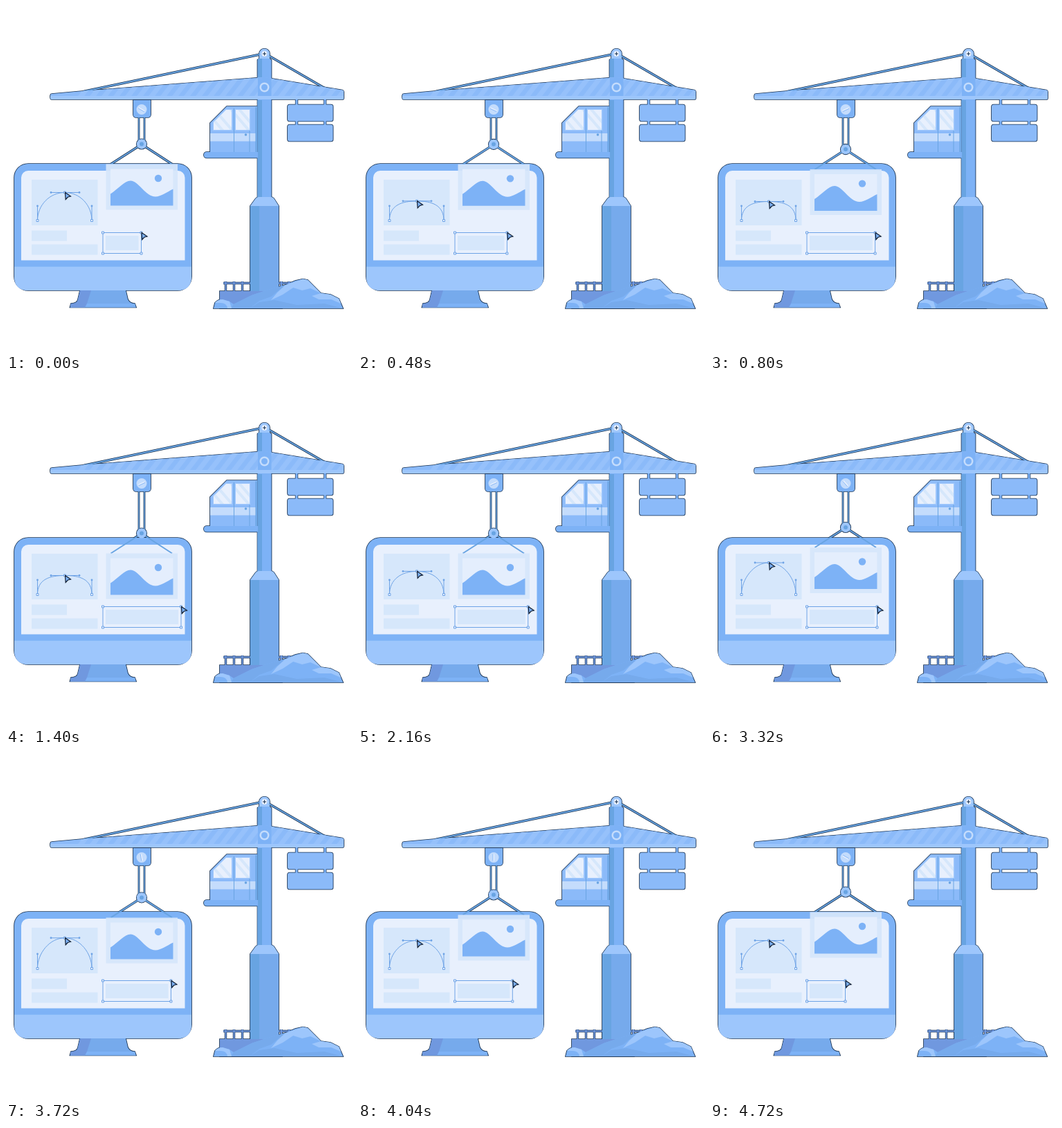
An HTML page with a canvas that plays this animation: 500 by 500 pixels, repeating every 5080 ms.

```html
<!DOCTYPE html>
<html lang="en">
<head>
<meta charset="utf-8">
<title>Crane building a page</title>
<style>
  html, body { margin: 0; width: 100%; height: 100%; overflow: hidden; background: #fff; }
  canvas { display: block; width: 100vw; height: 100vh; }
</style>
</head>
<body>
<canvas id="stage" width="500" height="500"></canvas>
<script>
const ctx = document.getElementById('stage').getContext('2d');
const LOOP = 5080, STEP = 40;
const C = {
  edge: '#17304f', mid: '#7db2f6', light: '#9dc6fc', soft: '#8bbaf9', dark: '#68a4e2',
  deep: '#7098df', shade: '#76aaec', panel: '#d6e7fb', screen: '#e8f0fd', line: '#6ea3e6', pale: '#c4dcfc'
};

// Each track is a list of [time, value]; values ease between neighbours.
const tracks = {
  hook: [[0, 199.5], [400, 199.5], [1400, 221.5], [2280, 221.5], [4720, 199.5]],
  right: [[0, 195.5], [1200, 253], [1880, 253], [2600, 231], [2680, 231], [3280, 241.5], [3520, 241.5], [4720, 195.5]],
  curve: [[0, 269.5], [560, 282.5], [1880, 282.5], [2600, 264], [3520, 264], [4040, 269.5]],
  dial: [[0, 30], [400, 30], [800, -25], [2280, -25], [4040, 90], [4720, 210]]
};

function valueAt(keys, t) {
  const i = keys.findIndex(k => k[0] > t);
  if (i < 0) return keys[keys.length - 1][1];
  const [t0, a] = keys[i - 1], [t1, b] = keys[i];
  return a + (b - a) * (1 - Math.cos(Math.PI * (t - t0) / (t1 - t0))) / 2;
}

// The scene is drawn twice: outlines first, then fills, so only the silhouette keeps its rim.
let rimPass = false;

function paint(path, fill, rim) {
  if (!rimPass) {
    ctx.fillStyle = fill;
    ctx.fill(path);
  } else if (rim) {
    ctx.strokeStyle = C.edge;
    ctx.lineWidth = 1.7;
    ctx.stroke(path);
  }
}

function box(x, y, w, h, fill, r = 0, rim) {
  const p = new Path2D();
  p.roundRect(x, y, w, h, r);
  paint(p, fill, rim);
}

function shape(d, fill, rim) {
  paint(new Path2D(d), fill, rim);
}

function disc(x, y, r, fill, rim) {
  const p = new Path2D();
  p.arc(x, y, r, 0, Math.PI * 2);
  paint(p, fill, rim);
}

function stroke(d, color, width = 1) {
  if (rimPass) return;
  ctx.strokeStyle = color;
  ctx.lineWidth = width;
  ctx.stroke(new Path2D(d));
}

function line(x1, y1, x2, y2, color, width) {
  stroke(`M${x1} ${y1}L${x2} ${y2}`, color, width);
}

function cable(x1, y1, x2, y2, color = C.dark, width = 2) {
  line(x1, y1, x2, y2, color, width);
  if (!rimPass) return;
  ctx.strokeStyle = C.edge;
  ctx.lineWidth = width + 1.4;
  ctx.beginPath();
  ctx.moveTo(x1, y1);
  ctx.lineTo(x2, y2);
  ctx.stroke();
}

function clipped(d, draw) {
  ctx.save();
  ctx.clip(new Path2D(d));
  draw();
  ctx.restore();
}

function drawMonitor() {
  shape('M107 411H173L176 424Q179 430 186 430L188 435.5H92.5L94 430Q103 430 104 424Z', C.shade, true);
  shape('M107 411H123L117 430H94Q103 430 104 424Z', C.deep);
  shape('M94 430H186L187.5 435.5H93Z', C.mid);
  shape('M94 430H117L114 435.5H93Z', C.deep);
  box(12, 228, 256, 183, C.mid, 20, true);
  clipped('M12 376.5H268V391Q268 411 248 411H32Q12 411 12 391Z',
    () => box(12, 376.5, 256, 36, C.light));
  box(22, 238, 236.5, 129.5, C.screen, [10, 10, 0, 0]);
  box(37, 251, 95.5, 66, C.panel);
  box(37, 324.5, 51, 15, C.panel);
  box(37, 344.5, 95.5, 15, C.panel);
}

function drawFence() {
  for (const x of [317.5, 329.5, 341.5, 354, 398, 409]) cable(x, 398, x, 413, C.deep);
  cable(314, 400.5, 420, 400.5, C.deep);
}

function drawTower() {
  box(309, 412, 90, 25, C.deep, 0, true);
  shape('M366 103V69A7.3 7 0 0 1 381 69V76L383.5 78V280H363.5V78L366 76Z', C.mid, true);
  box(363.5, 136, 6.5, 142, C.dark);
  shape('M366 76V69A7.3 7 0 0 1 381 69V76Z', C.light);
  box(364, 76, 6, 30, C.dark);
  shape('M353 412V289L361 278Q363 276 366 276H382Q385 276 387 278L394 289V412Z', C.shade, true);
  shape('M353 289L361 278Q363 276 366 276H382Q385 276 387 278L394 289Z', C.light);
  box(353, 289, 13, 123, C.dark);
}

function drawRocks() {
  shape('M300 437L302 429Q306 424 313 424L323 427L329 431L355 418L376 411L404 403L418 397L429 394.5L436 396L455 415L469 417L481 423L487 437Z', C.mid, true);
  shape('M329 431L355 418L376 411L404 403L383 420L366 426L352 437H325Z', C.shade);
  shape('M404 403L429 394.5L436 396L455 415L440 408L428 411L415 407L400 417L383 425L392 414Z', C.light);
  shape('M455 415L469 417L481 423L484 430L470 424L452 424L442 419Z', C.light);
  shape('M302 429Q306 424 313 424L323 427L326 437H320Q319 429 310 429Z', C.light);
  shape('M352 437L366 428L388 425L420 432L460 430L487 437Z', C.shade);
}

function drawCab() {
  shape('M295 213V169L319 145H363V213Z', C.soft, true);
  box(286, 211, 78, 8.5, C.mid, [4, 0, 0, 4], true);
  box(295, 184, 67, 11.5, C.pale);
  const panes = 'M300 179V168L318 150H326V179ZM332 150H352V179H332Z';
  stroke(panes, C.light, 3);
  shape(panes, C.screen);
  clipped(panes, () => {
    for (const x of [300, 314, 338, 350]) line(x - 15, 147, x + 15, 182, C.panel, 4);
  });
  line(329.5, 148, 329.5, 211, C.dark, 1);
  line(352, 180, 352, 211, C.dark, 1);
  line(361.5, 146, 361.5, 211, C.dark, 2);
  disc(346.5, 186, 1.8, C.dark);
}

function drawCounterweight() {
  for (const x of [420, 461]) cable(x, 134, x, 173, C.mid, 3);
  for (const y of [142.5, 171.5]) box(407, y, 65.5, 24, C.soft, 3, true);
}

function drawJib() {
  cable(112, 123.5, 367, 70);
  cable(380, 72, 461, 119);
  const beam = 'M66 127L110 123L373 103L486 121.5Q488 122 488 124V133Q488 135 486 135H66Q64 135 64 131T66 127Z';
  shape(beam, C.soft, true);
  clipped(beam, () => {
    for (let x = 104; x < 480; x += 17) line(x, 136, x + 27, 101, '#96c1fb', 7);
    box(364, 101, 19.5, 35, C.mid);
    box(60, 130, 430, 7, C.light);
  });
  disc(373.5, 117.5, 7, C.pale);
  disc(373.5, 117.5, 4.5, C.mid);
  disc(373.5, 69, 4, C.screen);
  stroke('M371 69H376M373.5 66.5V71.5', C.edge, 1);
}

function drawPicture(y) {
  ctx.globalAlpha = 0.92;
  box(144.5, y, 103.5, 66, C.panel);
  ctx.globalAlpha = 1;
  box(151, y + 7, 90.5, 53, '#e4eefd');
  disc(220, y + 20.5, 5.2, C.mid);
  ctx.save();
  ctx.translate(151, y);
  shape('M0 43C11 36 20 24 29 24C40 24 51 47 65 47C73 47 82 40 90.5 36V60H0Z', C.mid);
  ctx.restore();
}

function drawHoist(y, angle) {
  const top = y + 29;
  cable(192, 160, 192, y, C.dark, 1.4);
  cable(200, 160, 200, y, C.dark, 1.4);
  cable(192, y + 3, 151.5, top);
  cable(200, y + 3, 240, top);
  drawPicture(top);
  disc(196, y, 7.2, C.light, true);
  disc(196, y, 3, C.dark);

  box(184, 136, 25, 25, C.mid, [0, 0, 4, 4], true);
  disc(196, 149.5, 7.5, C.pale);
  ctx.save();
  ctx.translate(196, 149.5);
  ctx.rotate(angle * Math.PI / 180);
  line(-5, 0, 5, 0, C.screen, 2);
  line(-5, 1, 5, 1, C.mid, 0.8);
  ctx.restore();
}

function knob(x, y) {
  box(x - 1.5, y - 1.5, 3, 3, C.screen);
  stroke(`M${x - 1.5} ${y - 1.5}h3v3h-3Z`, C.line);
}

function cursor(x, y) {
  const arrow = 'M0.5 0.5L8.5 6L4.5 7L1.2 10.5Z';
  ctx.save();
  ctx.translate(x, y);
  shape(arrow, C.mid);
  stroke(arrow, '#101d30', 1.2);
  ctx.restore();
}

function drawCurve(y) {
  stroke(`M45.5 310C45.5 288 63 ${y} 85 ${y}S124 288 124 310`, C.line);
  line(65, y, 106, y, C.line, 1);
  disc(65, y, 1.4, C.line);
  disc(106, y, 1.4, C.line);
  for (const x of [45.5, 124]) {
    line(x, 289, x, 310, C.line, 1);
    disc(x, 289, 1.4, C.line);
    knob(x, 310);
  }
  knob(85, y);
  cursor(85, y - 0.5);
}

function drawSelection(right) {
  box(144, 332, right - 148, 21, C.panel);
  stroke(`M140 327.5H${right}V357.5H140Z`, C.line);
  for (const x of [140, right]) for (const y of [327.5, 357.5]) knob(x, y);
  cursor(right, 327);
}

function drawScene(t) {
  const pose = name => valueAt(tracks[name], t);
  drawFence();
  drawTower();
  drawRocks();
  drawCab();
  drawCounterweight();
  drawJib();
  drawMonitor();
  drawCurve(pose('curve'));
  drawHoist(pose('hook'), pose('dial'));
  drawSelection(pose('right'));
}

function render(t) {
  ctx.fillStyle = '#fff';
  ctx.fillRect(0, 0, 500, 500);
  for (const pass of [true, false]) {
    rimPass = pass;
    drawScene(t);
  }
}

const start = performance.now();
function tick() {
  const t = (performance.now() - start) % LOOP;
  render(Math.floor(t / STEP) * STEP);
  requestAnimationFrame(tick);
}
tick();
</script>
</body>
</html>
```
